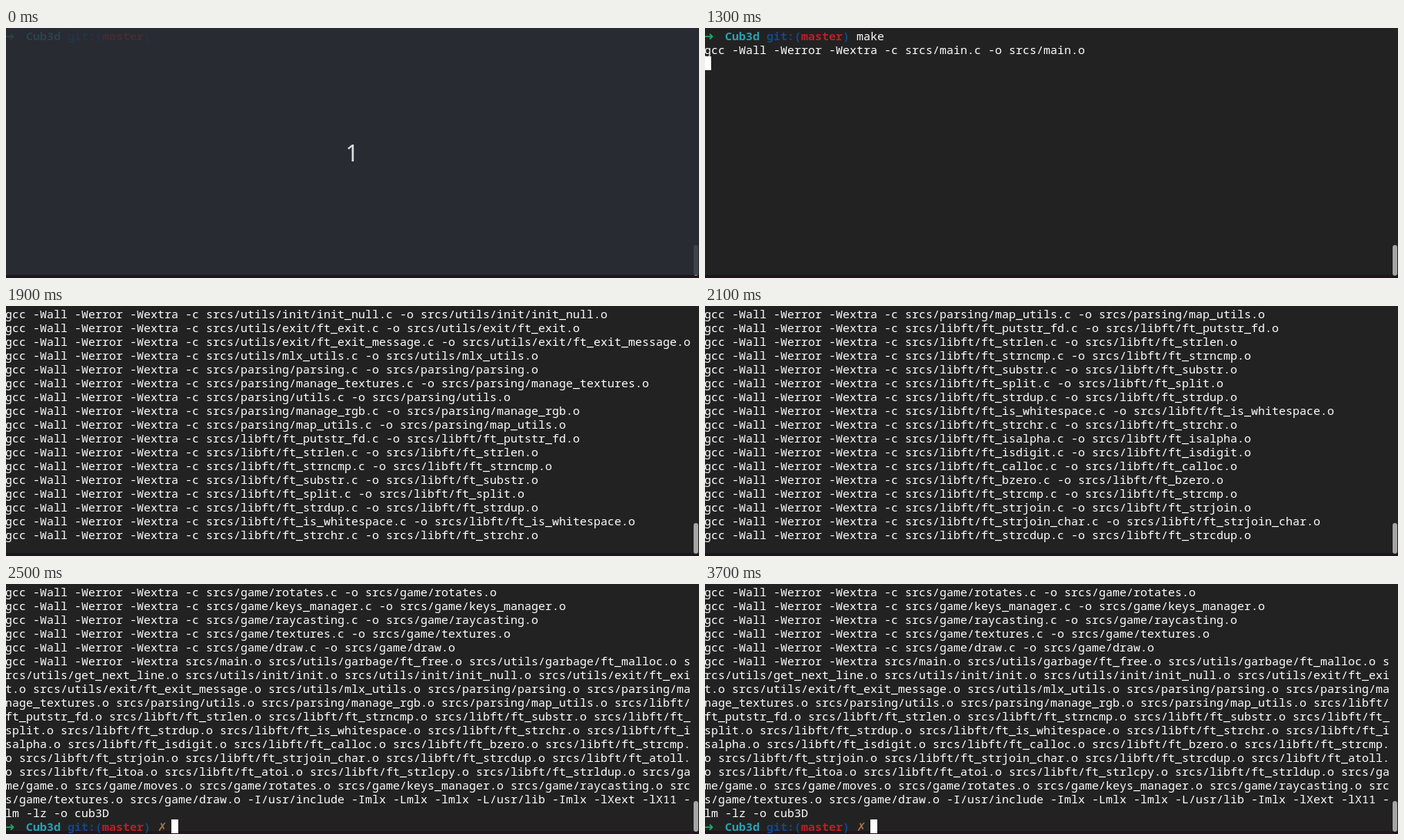
These frames come from a looping animation (901 by 326 pixels, 4200 ms). An HTML page with a canvas:

```html
<!DOCTYPE html>
<html lang="en">
<head>
<meta charset="utf-8">
<title>Terminal build</title>
<style>
  html, body { margin: 0; width: 100%; height: 100%; overflow: hidden; background: #222; }
  canvas { display: block; }
</style>
</head>
<body>
<canvas id="stage" width="901" height="326"></canvas>
<script>
const ctx = document.getElementById('stage').getContext('2d');
const LOOP = 4200, CELL = 9, ROW = 18, COLS = 99, ROWS = 18;
const MONO = '15px "Noto Sans Mono", "DejaVu Sans", monospace';

const folders = {
  'srcs': 'main',
  'srcs/utils': 'garbage/ft_free garbage/ft_malloc get_next_line init/init init/init_null exit/ft_exit exit/ft_exit_message mlx_utils',
  'srcs/parsing': 'parsing manage_textures utils manage_rgb map_utils',
  'srcs/libft': 'ft_putstr_fd ft_strlen ft_strncmp ft_substr ft_split ft_strdup ft_is_whitespace ft_strchr ft_isalpha ft_isdigit ' +
    'ft_calloc ft_bzero ft_strcmp ft_strjoin ft_strjoin_char ft_strcdup ft_atoll ft_itoa ft_atoi ft_strlcpy ft_strldup',
  'srcs/game': 'game moves rotates keys_manager raycasting textures draw'
};
const files = Object.entries(folders).flatMap(([dir, names]) => names.split(' ').map(n => dir + '/' + n));
const gcc = 'gcc -Wall -Werror -Wextra ';
const compiles = files.map(f => `${gcc}-c ${f}.c -o ${f}.o`);
const link = gcc + files.map(f => f + '.o').join(' ') +
  ' -I/usr/include -Imlx -Lmlx -lmlx -L/usr/lib -Imlx -lXext -lX11 -lm -lz -o cub3D';
const linkRows = link.match(new RegExp(`.{1,${COLS}}`, 'g'));

// Compiled files visible at each 100 ms step from 1300 ms on
const progress = [1, 4, 8, 12, 15, 18, 22, 26, 30, 34, 38, 42];

const prompt = [
  [0, '➜', '#26a269'], [3, 'Cub3d', '#2aa1b3'], [9, 'git:(', '#12488b'],
  [14, 'master', '#c01c28'], [20, ')', '#12488b']
];

function put(col, row, text, color = '#fff', weight = '') {
  ctx.font = weight + MONO;
  ctx.fillStyle = color;
  ctx.fillText(text, col * CELL - 1, row * ROW + 16);
}

function putPrompt(row) {
  for (const [col, text, color] of prompt) put(col, row, text, color, 'bold ');
}

function typed(t) {
  return 'make'.slice(0, t < 800 ? 0 : t < 900 ? 1 : t < 1000 ? 2 : t < 1200 ? 3 : 4);
}

function cursorOn(t) {
  return (t >= 200 && t < 1800) || (t >= 2400 && t < 3100) || t >= 3700;
}

function drawCountdown() {
  ctx.fillStyle = 'rgba(42,46,54,.82)';
  ctx.fillRect(0, 0, 901, 322);
  ctx.fillStyle = '#dcdfdd';
  ctx.font = '30px "Noto Sans", "Open Sans", sans-serif';
  ctx.textAlign = 'center';
  ctx.fillText('1', 450, 174);
  ctx.textAlign = 'left';
}

function draw(t) {
  ctx.fillStyle = '#222';
  ctx.fillRect(0, 0, 901, 326);
  ctx.fillStyle = '#1f151d';
  ctx.fillRect(0, 322, 901, 4);
  ctx.fillStyle = '#a5a5a5';
  ctx.beginPath();
  ctx.roundRect(894, 283, 6, 40, 3);
  ctx.fill();

  const done = t >= 2500;
  const command = typed(t);
  const output = done ? [...compiles, ...linkRows]
    : t < 1300 ? [] : compiles.slice(0, progress[Math.floor(t / 100) - 13]);
  const last = t < 1300 ? 0 : output.length + 1;
  const top = Math.max(0, last + 1 - ROWS);

  if (top === 0) {
    putPrompt(0);
    put(22, 0, command);
  }
  output.forEach((line, i) => {
    if (i + 1 >= top) put(0, i + 1 - top, line);
  });

  let col = t < 1300 ? 22 + command.length : 0;
  if (done) {
    putPrompt(last - top);
    put(22, last - top, '✗', '#a2734c', 'bold ');
    col = 24;
  }
  if (cursorOn(t)) {
    ctx.fillStyle = '#fff';
    ctx.fillRect(col * CELL - 1, (last - top) * ROW + 1, CELL, ROW);
  }
  if (t < 100) drawCountdown();
}

const start = performance.now();
function tick() {
  draw((performance.now() - start) % LOOP);
  requestAnimationFrame(tick);
}
tick();
</script>
</body>
</html>
```
